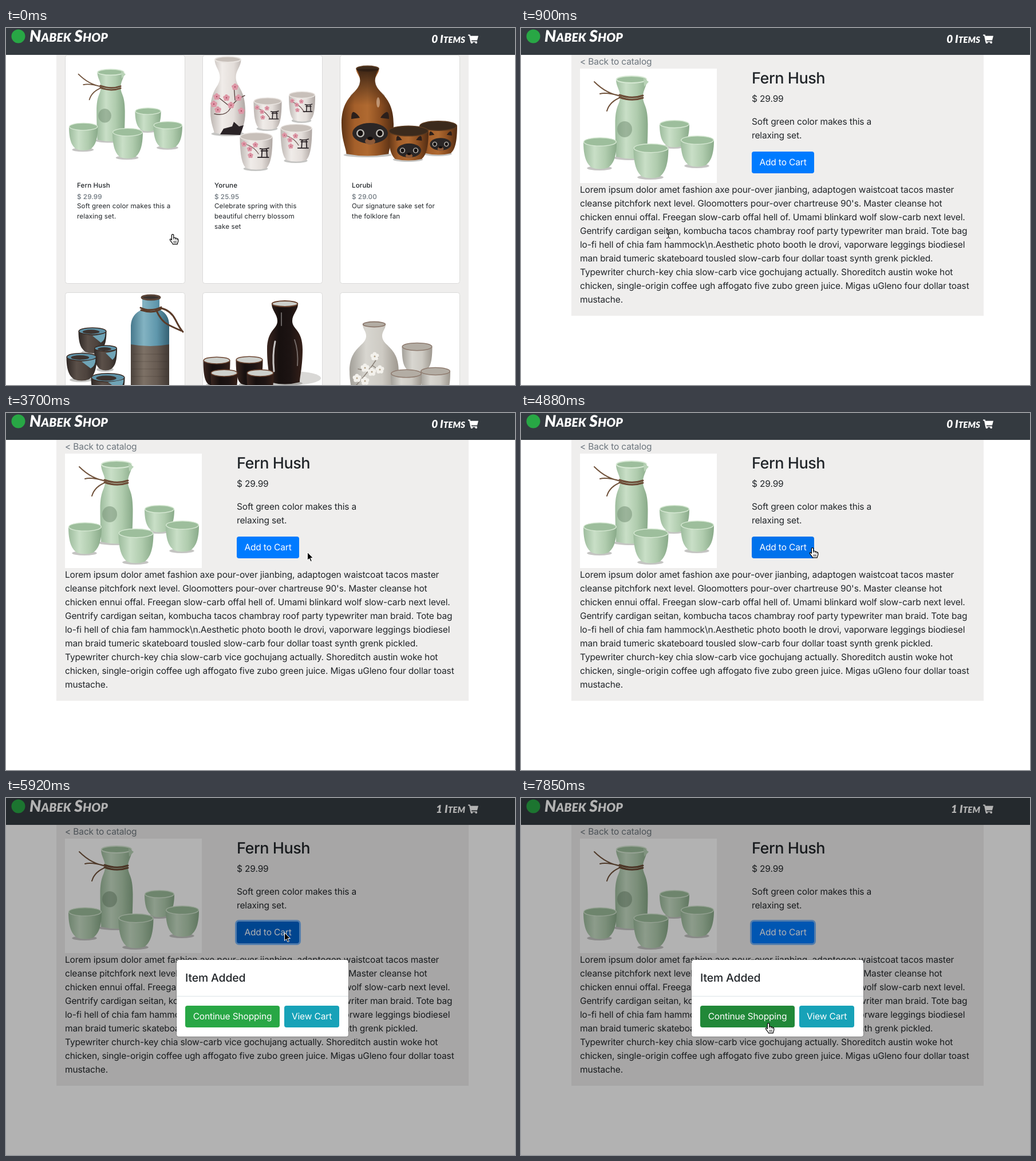
An HTML page with a canvas that plays this animation: 889x624 px, repeating every 8000 ms.

```html
<!DOCTYPE html>
<html lang="en">
<head>
<meta charset="utf-8">
<title>Shop</title>
<style>
html, body { margin: 0; width: 100%; height: 100%; overflow: hidden; background: #fff; }
#stage { position: relative; width: 889px; height: 624px; overflow: hidden;
  font: 400 15.5px/24px Inter, "Open Sans", sans-serif; letter-spacing: -.14px;
  color: #212529; white-space: nowrap; text-rendering: geometricPrecision; }
#stage div, #stage svg, #stage canvas { position: absolute; }
.layer { left: 0; top: 0; width: 889px; height: 624px; }
.item { top: 265.5px; font-size: 11.63px; line-height: 18px; letter-spacing: .12px; }
.item b { display: block; height: 20px; font-weight: 500; }
.item b + b { height: 16.5px; color: #6c757d; }
.muted { color: #6c757d; }
.btn { height: 38px; line-height: 38px; border-radius: 4px; color: #fff; text-align: center; }
h3 { position: absolute; margin: 0; font-weight: 500; }
#detail h3 { left: 403px; top: 71px; font-size: 27.1px; line-height: 33.6px; letter-spacing: -.5px; }
#dialog { left: 297px; top: 282px; width: 300px; height: 134px; background: #fff;
  border: 1px solid rgba(0,0,0,.2); border-radius: 5px; background-clip: padding-box; }
#dialog h3 { left: 15px; top: 16px; font-size: 19.4px; line-height: 30px; letter-spacing: -.13px; }
#dialog hr { position: absolute; left: 0; right: 0; top: 63px; height: 1px; margin: 0; border: 0; background: #dce4e8; }
#dialog .btn { top: 80px; }
.mark { font: italic 900 28px Lato, "Open Sans", sans-serif; letter-spacing: 0; fill: #fff; }
.mark .s { font-size: 21px; }
#count { font-size: 19px; }
#count .s { font-size: 15.2px; }
</style>
</head>
<body>
<div id="stage">
  <div id="catalog" class="layer">
    <canvas width="889" height="624"></canvas>
    <div class="item" style="left:124px"><b>Fern Hush</b><b>$ 29.99</b>Soft green color makes this a<br>relaxing set.</div>
    <div class="item" style="left:364px"><b>Yorune</b><b>$ 25.95</b>Celebrate spring with this<br>beautiful cherry blossom<br>sake set</div>
    <div class="item" style="left:604px"><b>Lorubi</b><b>$ 29.00</b>Our signature sake set for<br>the folklore fan</div>
  </div>

  <div id="detail" class="layer">
    <canvas width="889" height="624"></canvas>
    <div class="muted" style="left:103px;top:47px">&lt; Back to catalog</div>
    <h3>Fern Hush</h3>
    <div style="left:403px;top:112px">$ 29.99</div>
    <div style="left:403px;top:152px">Soft green color makes this a<br>relaxing set.</div>
    <div id="add" class="btn" style="left:403px;top:216px;width:109px">Add to Cart</div>
    <div style="left:103px;top:271px">Lorem ipsum dolor amet fashion axe pour-over jianbing, adaptogen waistcoat tacos master<br>
cleanse pitchfork next level. Gloomotters pour-over chartreuse 90's. Master cleanse hot<br>
chicken ennui offal. Freegan slow-carb offal hell of. Umami blinkard wolf slow-carb next level.<br>
Gentrify cardigan seitan, kombucha tacos chambray roof party typewriter man braid. Tote bag<br>
lo-fi hell of chia fam hammock\n.Aesthetic photo booth le drovi, vaporware leggings biodiesel<br>
man braid tumeric skateboard tousled slow-carb four dollar toast synth grenk pickled.<br>
Typewriter church-key chia slow-carb vice gochujang actually. Shoreditch austin woke hot<br>
chicken, single-origin coffee ugh affogato five zubo green juice. Migas uGleno four dollar toast<br>
mustache.</div>
  </div>

  <svg class="layer" viewBox="0 0 889 624">
    <path d="M0 0H889V47H0z" fill="#343a40"/>
    <circle cx="21.5" cy="14.5" r="12" fill="#28a745"/>
    <text class="mark" x="41" y="24">N<tspan class="s">ABEK</tspan> S<tspan class="s">HOP</tspan></text>
    <text class="mark" id="count" x="802" y="25.5" text-anchor="end"><tspan id="num">0</tspan> I<tspan class="s" id="unit">TEMS</tspan></text>
    <g fill="#fff">
      <path d="M807 11.5h3.6l.6 2.3H825l-2 7.8h-10.2l.3 1.6h9.4v1.6h-11.2l-2.3-11.4H807z"/>
      <circle cx="813.4" cy="25.4" r="1.8"/><circle cx="821.2" cy="25.4" r="1.8"/>
    </g>
  </svg>

  <div id="modal" class="layer" style="background:rgba(0,0,0,.3)">
    <div id="dialog">
      <h3>Item Added</h3><hr>
      <div id="more" class="btn" style="left:15px;width:165px">Continue Shopping</div>
      <div id="view" class="btn" style="left:188px;width:96px">View Cart</div>
    </div>
  </div>

  <svg class="layer" viewBox="0 0 889 624">
    <g id="hand" stroke="#000" stroke-linejoin="round" stroke-linecap="round">
      <path fill="#fff" stroke-width="1.2" d="M-1.6 1.4C-1.6-1 1.8-1 1.8 1.4V6C2.5 4.8 4.8 5 4.9 6.8 5.6 5.8 7.6 6 7.7 7.8 8.6 7 9.8 7.4 9.8 9V11C9.8 13.4 8.3 14 8.3 16.8H.2C.2 15-2.5 13-4.4 10-5.4 8-3.6 7.2-2.5 8.4L-1.6 9.6z"/>
      <path fill="none" d="M1.8 6V8.5M4.9 7V9M7.7 8V9.5M2.2 11.5V14.5M4.2 11.5V14.5M6.2 11.5V14.5" stroke-width=".8"/>
    </g>
    <path id="beam" fill="none" stroke="#111" stroke-linecap="square" d="M-2.5-7.5Q.5-7.5.5-5.5V5.5Q.5 7.5-2.5 7.5M3.5-7.5Q.5-7.5.5-5.5M.5 5.5Q.5 7.5 3.5 7.5M-1 .5H2"/>
    <path id="arrow" stroke="#fff" d="M.5.5V14.4L3.7 11.4 6 16.7 8.3 15.7 6 10.5H10.4z"/>
  </svg>
</div>

<script>
const $ = id => document.getElementById(id);
const PAPER = '#efeeed';

/* ---------- drawing helpers ---------- */
function across(g, x0, x1, colors) {
  const fill = g.createLinearGradient(x0, 0, x1, 0);
  colors.forEach((c, i) => fill.addColorStop(i / (colors.length - 1), c));
  return fill;
}

function oval(g, x, y, rx, ry, fill, stroke, width = 1.5) {
  g.beginPath();
  g.ellipse(x, y, rx, ry, 0, 0, 7);
  if (fill) { g.fillStyle = fill; g.fill(); }
  if (stroke) { g.strokeStyle = stroke; g.lineWidth = width; g.stroke(); }
}

function shape(g, d, fill) {
  g.fillStyle = fill;
  g.fill(new Path2D(d));
}

function line(g, d, color, width) {
  g.strokeStyle = color;
  g.lineWidth = width;
  g.lineCap = 'round';
  g.stroke(new Path2D(d));
}

function cup(g, x, y, r, base, look) {
  const h = base - y, foot = r * (look.foot || .5);
  oval(g, x - 1, base - 1, r * .75, 4, 'rgba(60,60,55,.3)');
  g.beginPath();
  g.moveTo(x - r, y);
  g.bezierCurveTo(x - r, y + h * .75, x - foot - 4, base - 6, x - foot, base - 2);
  g.quadraticCurveTo(x, base + 3, x + foot, base - 2);
  g.bezierCurveTo(x + foot + 4, base - 6, x + r, y + h * .75, x + r, y);
  g.fillStyle = across(g, x - r, x + r, look.body);
  g.fill();
  oval(g, x, y, r - .7, r * .25, look.inside, look.rim);
}

function bottle(g, x, b, look) {
  const [top, base, lip, neck, neckY, belly, bellyY, foot] = b;
  const up = neckY - top, mid = bellyY - neckY, low = base - bellyY;
  oval(g, x, base - 1, foot + 5, 4, 'rgba(60,60,55,.3)');
  g.beginPath();
  g.moveTo(x - lip, top);
  g.bezierCurveTo(x - lip, top + up * .4, x - neck, neckY - up * .4, x - neck, neckY);
  g.bezierCurveTo(x - neck, neckY + mid * .3, x - belly, bellyY - mid * .7, x - belly, bellyY);
  g.bezierCurveTo(x - belly, bellyY + low * .5, x - foot, base - low * .2, x - foot, base - 3);
  g.quadraticCurveTo(x, base + 4, x + foot, base - 3);
  g.bezierCurveTo(x + foot, base - low * .2, x + belly, bellyY + low * .5, x + belly, bellyY);
  g.bezierCurveTo(x + belly, bellyY - mid * .7, x + neck, neckY + mid * .3, x + neck, neckY);
  g.bezierCurveTo(x + neck, neckY - up * .4, x + lip, top + up * .4, x + lip, top);
  g.fillStyle = across(g, x - belly, x + belly, look.body);
  g.fill();
  oval(g, x, top, lip - .7, lip * .22, look.inside, look.rim, 2);
}

function flower(g, x, y, r, color, heart) {
  for (let i = 0; i < 5; i++) {
    const a = i * Math.PI * .4 - 1.6;
    oval(g, x + Math.cos(a) * r * .6, y + Math.sin(a) * r * .6, r * .48, r * .48, color);
  }
  oval(g, x, y, r * .22, r * .22, heart);
}

function gate(g, x, y, s) {
  g.save();
  g.translate(x, y);
  g.scale(s, s);
  line(g, 'M-8-8Q0-6 8-9M-6-4H6M-4-7L-5 8M4-7L5 8M-12 8H8', '#2a2326', 2);
  g.restore();
}

function face(g, x, y, s) {
  g.save();
  g.translate(x, y);
  g.scale(s, s);
  for (const k of [-1, 1])
    shape(g, `M${k * 33}-25Q${k * 33}-39 ${k * 28}-37Q${k * 22}-34 ${k * 18}-27z`, '#2b1f1b');
  oval(g, 0, 0, 31, 18, '#2a2626');
  for (const k of [-17, 17]) {
    oval(g, k, 0, 7, 7, '#bdbab4');
    oval(g, k, 0, 4.5, 5, '#15100f');
  }
  oval(g, 0, 14, 9, 6, '#8d5a38');
  oval(g, 0, 9, 5, 3, '#100c0b');
  g.restore();
}

/* ---------- product pictures ---------- */
const green = { body: ['#9dbc9d', '#c9dfc7', '#b0ccae', '#89aa89'], inside: '#9dbe9c', rim: '#d6e8d3' };
function greenSet(g) {
  bottle(g, 193, [90, 228, 27, 20, 120, 28.5, 168, 27], green);
  shape(g, 'M214 88L223 94 215 103z', '#b9d3b7');
  oval(g, 181, 177, 13, 14, 'rgba(118,146,118,.55)');
  line(g, 'M172 117Q193 125 213 118M172 121Q193 129 213 122', '#6b4a35', 3);
  line(g, 'M176 119Q150 116 128 94M174 119Q150 112 138 115M175 121Q155 128 150 145', '#71533c', 2);
  for (const [x, y, r, base] of [[268, 168, 26, 208], [138, 199, 29, 246], [308, 196, 29, 242], [227, 210, 30.5, 262]])
    cup(g, x, y, r, base, green);
}

function blossomSet(g) {
  const look = { body: ['#bdb6b2', '#f0ece9', '#e4deda', '#aea6a2'], inside: '#c8c0ba', rim: '#e9e4e0', foot: .62 };
  const pink = ['#dd97a6', '#b04a62'];
  bottle(g, 387.5, [55, 186, 23, 14, 86, 30.5, 147, 24], look);
  line(g, 'M417 118Q400 125 392 140T364 150M400 126L398 100M392 138L372 122', '#5a4341', 1.4);
  for (const [x, y] of [[400, 103], [370, 143], [406, 122], [385, 122], [411, 145], [393, 135], [368, 120], [363, 133]])
    flower(g, x, y, 5.5, ...pink);
  shape(g, 'M374 186L380 176 395 172 398 164 407 172 415 170 409 187z', '#2a2326');
  for (const [x, y, r, base] of [[457, 128, 24.5, 177], [517, 117, 23, 163], [437, 190, 28.5, 247], [507, 175, 27.5, 233]]) {
    cup(g, x, y, r, base, look);
    line(g, `M${x - r + 3} ${y + 12}Q${x - 6} ${y + 14} ${x + 4} ${y + 30}`, '#6b5150', 1.2);
    for (const [dx, dy] of [[-.75, .45], [-.4, .75], [-.05, .5], [-.35, 1.15]])
      flower(g, x + dx * r, y + dy * r, r * .16, ...pink);
    gate(g, x + r * .5, y + r, r / 30);
  }
}

function folkSet(g) {
  const look = { body: ['#5f3415', '#a45f2a', '#b06a31', '#8a4d20', '#4f2b13'], inside: '#3b2a1c', rim: '#5a3a20', foot: .66 };
  bottle(g, 631.5, [71, 223, 20, 13, 92, 45.5, 168, 37], look);
  const glaze = g.createLinearGradient(0, 70, 0, 135);
  glaze.addColorStop(0, 'rgba(45,28,17,.9)');
  glaze.addColorStop(1, 'rgba(45,28,17,0)');
  shape(g, 'M612 72Q618 80 618.5 92Q617 106 602 117L596 135H667L661 117Q646 106 644.5 92Q645 80 651 72z', glaze);
  face(g, 636, 184, 1);
  oval(g, 650, 130, 3, 9, 'rgba(255,235,215,.45)');
  cup(g, 755, 171, 33, 221, look);
  face(g, 759, 203, .6);
  cup(g, 703, 180, 35, 231, look);
  face(g, 704, 214, .68);
}

function tealSet(g) {
  const teal = ['#47798d', '#83b3c2', '#5f97ac', '#335e70'];
  const clay = ['#4b423c', '#7d7166', '#675b52', '#3f3732'];
  const look = { body: ['#2f2825', '#5b5049', '#4d433d', '#2b2522'], inside: '#5f93a8', rim: '#3b2a22' };
  g.fillStyle = across(g, 218, 286, clay);
  g.fillRect(218, 545, 67, 79);
  line(g, 'M222 570H282M221 583H282M220 596H282M220 609H282', 'rgba(40,34,30,.25)', 1);
  shape(g, 'M238 472H268V492Q285 500 285 520V553Q252 559 218 553V520Q219 500 238 492z', across(g, 218, 286, teal));
  oval(g, 253, 471, 16, 4, '#38322f', '#5a4437', 3);
  line(g, 'M235 489Q252 497 271 488M236 493Q258 500 272 490Q288 494 296 510T309 531M262 492Q270 512 284 519T306 529', '#5a3b29', 3);
  for (const [x, y, r, base] of [[151, 530, 24.5, 568], [174, 560, 20, 598], [132, 575, 26.5, 616], [178, 611, 29.5, 650]]) {
    cup(g, x, y, r, base, look);
    shape(g, `M${x} ${y + 8}Q${x + r * .7} ${y + 6} ${x + r - 2} ${y + 3}Q${x + r - 2} ${y + 16} ${x + r * .6} ${y + 20}z`, '#6fa4b6');
    oval(g, x - r * .1, y + 1, r * .6, r * .15, '#3d3430');
  }
}

function blackSet(g) {
  const look = { body: ['#3a2620', '#17100f', '#1d1413', '#352019'], inside: '#cdd0cc', rim: '#6b4430', foot: .6 };
  oval(g, 500, 612, 50, 12, '#d9d8d6');
  bottle(g, 487, [482, 622, 23, 13, 512, 31, 562, 26], look);
  line(g, 'M470 548Q465 570 468 600', 'rgba(255,255,255,.75)', 3);
  line(g, 'M481 498V520M504 545Q511 565 509 590', 'rgba(255,255,255,.35)', 2);
  for (const [x, y] of [[368, 581], [425, 580], [381, 603], [444, 603]])
    cup(g, x, y, 23.5, y + 44, look);
}

function graySet(g) {
  const look = { body: ['#a3a099', '#d8d6d0', '#cdcac3', '#9d978e'], inside: '#b3ada4', rim: '#8f7c70', foot: .65 };
  bottle(g, 643, [518, 650, 20, 14, 538, 43, 600, 36], look);
  line(g, 'M612 624Q630 605 650 575M634 600L615 596M640 590L655 600', '#8a8178', 1.5);
  for (const [x, y] of [[627, 594], [644, 574], [639, 601], [653, 597], [613, 612], [627, 617]])
    flower(g, x, y, 7, '#f3f1ec', '#b5a58c');
  for (const [x, y, r] of [[718, 557, 26.5], [750, 600, 26], [699, 604, 27]])
    cup(g, x, y, r, y + 42, look);
}

function paintCatalog(g) {
  g.fillStyle = PAPER;
  g.fillRect(88, 47, 720, 577);
  for (const y of [47, 462]) for (const x of [103, 343, 583]) {
    g.beginPath();
    g.roundRect(x + .5, y + .5, 209, 399, 4);
    g.fillStyle = '#fff';
    g.fill();
    g.strokeStyle = '#dadad9';
    g.lineWidth = 1;
    g.stroke();
  }
  g.save();
  g.transform(.8684, 0, 0, .874, 15.34, -1.42);
  greenSet(g);
  g.restore();
  for (const paint of [blossomSet, folkSet, tealSet, blackSet, graySet]) paint(g);
}

function paintDetail(g) {
  g.fillStyle = PAPER;
  g.fillRect(88, 47, 720, 456);
  g.fillStyle = '#fff';
  g.fillRect(103, 71, 239, 200);
  greenSet(g);
}

paintCatalog(document.querySelector('#catalog canvas').getContext('2d'));
paintDetail(document.querySelector('#detail canvas').getContext('2d'));

const LOOP = 8000, TICK = 148;
// tick, x, y of the pointer's hot spot
const track = [
  [0, 291, 361], [2, 257, 361], [4, 257, 361], [5, 257, 360], [7, 257, 360], [11, 343, 359],
  [13, 343, 359], [14, 345, 358], [21, 514, 282], [25, 526, 243], [27, 526, 243], [30, 513, 236],
  [32, 513, 236], [36, 488, 237], [39, 488, 237], [40, 486, 235], [45, 505, 350],
  [46, 512, 384], [50, 512, 384], [53, 432, 394], [55, 432, 394]
];
// each list: value, then pairs of tick and the value from there on
const pointer = ['hand', 5, 'beam', 22, 'arrow', 33, 'hand', 40, 'arrow', 46, 'hand'];
const addColor = ['#007bff', 33, '#0072ec', 34, '#0069d9', 39, '#0062cc', 41, '#007bff'];
const addRing = ['none', 39, '0 0 0 2px rgba(0,123,255,.35)', 40, '0 0 0 3px rgba(0,123,255,.5)'];
const viewColor = ['#17a2b8', 46, '#1593a7', 47, '#138496', 51, '#1593a7', 52, '#17a2b8'];
const moreColor = ['#28a745', 52, '#25983f', 53, '#218838'];

function at(list, tick) {
  let value = list[0];
  for (let i = 1; i < list.length; i += 2) if (tick >= list[i]) value = list[i + 1];
  return value;
}

function spot(tick) {
  const i = Math.max(1, track.findIndex(k => k[0] >= tick));
  const [t0, x0, y0] = track[i - 1], [t1, x1, y1] = track[i];
  const u = (tick - t0) / (t1 - t0), e = u * u * (3 - 2 * u);
  return [Math.round(x0 + (x1 - x0) * e), Math.round(y0 + (y1 - y0) * e)];
}

const show = (id, on) => { $(id).style.display = on ? '' : 'none'; };

function render() {
  const tick = Math.floor((performance.now() % LOOP + 6) / TICK);
  const added = tick >= 40;
  show('catalog', tick < 5);
  show('detail', tick >= 6);
  show('modal', added);
  $('num').textContent = added ? '1' : '0';
  $('unit').textContent = added ? 'TEM' : 'TEMS';
  $('add').style.background = at(addColor, tick);
  $('add').style.boxShadow = at(addRing, tick);
  $('view').style.background = at(viewColor, tick);
  $('more').style.background = at(moreColor, tick);
  const [x, y] = spot(tick), kind = at(pointer, tick);
  for (const id of ['hand', 'beam', 'arrow']) {
    show(id, id === kind);
    $(id).setAttribute('transform', `translate(${x} ${y})`);
  }
  requestAnimationFrame(render);
}
render();
</script>
</body>
</html>
```
